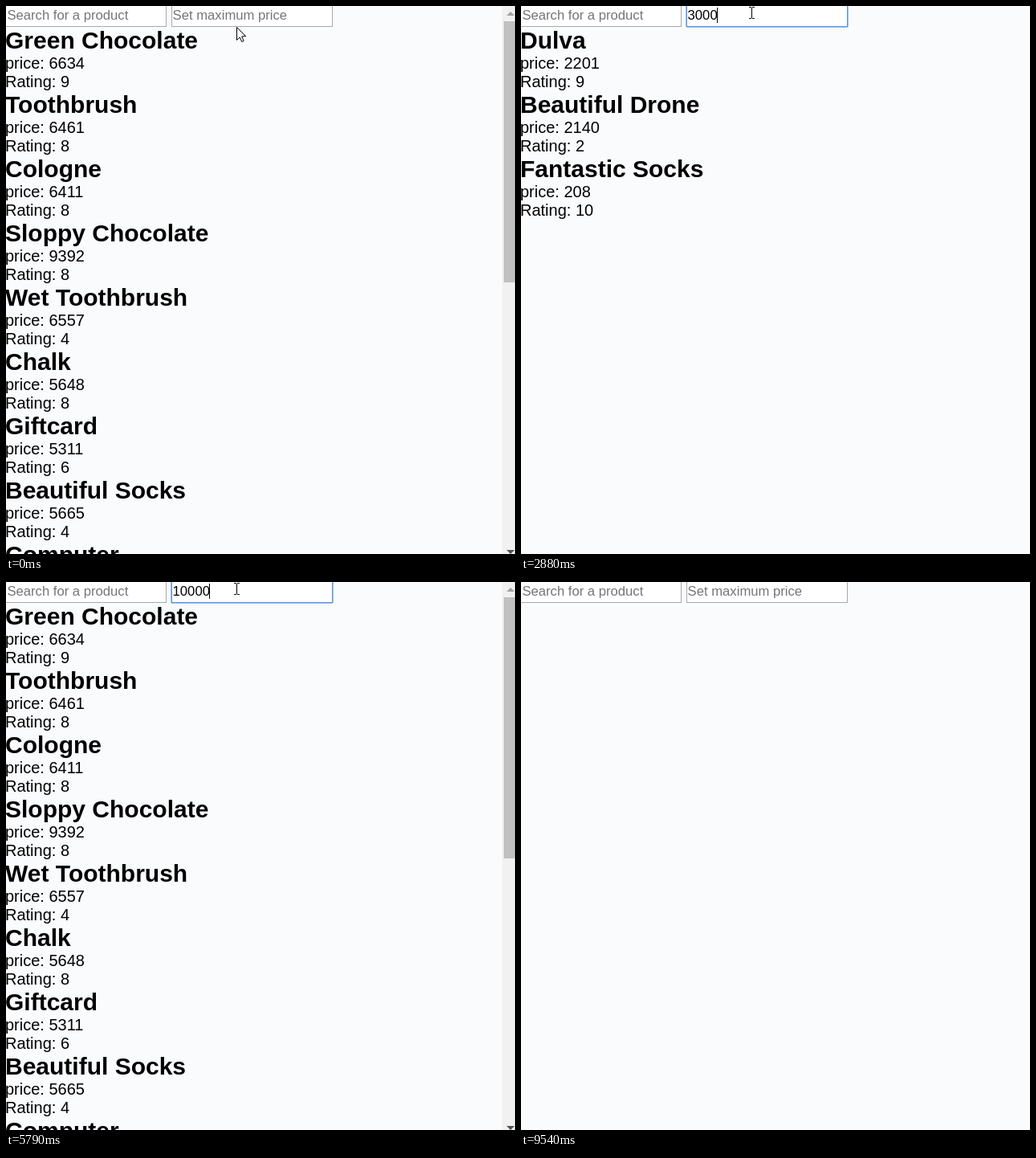
An HTML page with a canvas for the animation above (9640 ms loop, 634 by 682 pixels).

```html
<!DOCTYPE html>
<html lang="en">
<head>
<meta charset="utf-8">
<title>Product filter</title>
<style>
  html, body { margin: 0; width: 100%; height: 100%; overflow: hidden; background: #fafbfd; }
  body { position: relative; font: 20px/23px "Liberation Sans", Arial, sans-serif; color: #000; }
  #list { position: absolute; left: -1px; top: 26px; white-space: nowrap; }
  h2 { margin: 0; font-size: 30px; line-height: 34px; }
  p { margin: 0; }
  .field { position: absolute; top: -3px; height: 28px; box-sizing: content-box; background: #fff;
    border: 1px solid #a9a9a9; border-top: 0; }
  .field span { position: absolute; top: 5px; font-size: 16.667px; line-height: 19px; white-space: pre; color: #757575; }
  #search { left: -2px; width: 200px; }
  #search span { left: 2.4px; }
  #price { left: 206px; width: 199px; }
  #price span { left: .6px; }
  #price.typed span { color: #000; }
  canvas { position: absolute; left: 0; top: 0; }
</style>
</head>
<body>
<div id="list"></div>
<div id="search" class="field"><span>Search for a product</span></div>
<div id="price" class="field"><span></span></div>
<canvas id="stage" width="634" height="682"></canvas>
<script>
const LOOP = 9640;
const products = [
  ['Green Chocolate', 6634, 9], ['Toothbrush', 6461, 8], ['Cologne', 6411, 8],
  ['Sloppy Chocolate', 9392, 8], ['Wet Toothbrush', 6557, 4], ['Chalk', 5648, 8],
  ['Giftcard', 5311, 6], ['Beautiful Socks', 5665, 4], ['Computer', 7120, 7],
  ['Dulva', 2201, 9], ['Beautiful Drone', 2140, 2], ['Fantastic Socks', 208, 10]
];
// time, typed text, caret visible
const typing = [
  [0, '', 0], [660, '', 1], [1120, '3', 1], [1450, '30', 1], [1580, '300', 1],
  [1860, '3000', 1], [2370, '3000', 0], [2880, '3000', 1], [3390, '3000', 0],
  [3540, '300', 0], [3900, '300', 1], [4080, '30', 1], [4230, '3', 1],
  [4380, '', 1], [4410, '', 0], [4590, '1', 1], [4740, '10', 1],
  [5100, '100', 1], [5250, '1000', 1], [5760, '1000', 0], [5790, '10000', 1],
  [6350, '10000', 0], [6860, '10000', 1], [7350, '1000', 1], [7370, '1000', 0],
  [7490, '100', 0], [7640, '10', 0], [7780, '1', 0], [7930, '1', 1],
  [8060, '', 1], [8440, '', 0], [8950, '', 1], [9460, '', 0]
];
// time, x, y of the pointer
const moves = [
  [0, 287, 26], [40, 287, 22], [90, 287, 18], [150, 287, 14], [200, 287, 10], [250, 287, 8],
  [6980, 285, 14], [7040, 282, 27], [7100, 279, 36]
];
const EXIT = 8570, GONE = 9030, EXIT_STEPS = 10;

const $ = id => document.getElementById(id);
const list = $('list'), price = $('price'), label = price.firstChild;
const ctx = $('stage').getContext('2d');
const latest = (rows, t) => rows.filter(r => r[0] <= t).pop();
let shownMax = null, shownText = null;

function showList(max) {
  if (max === shownMax) return;
  shownMax = max;
  list.innerHTML = products.filter(p => p[1] <= max)
    .map(([name, cost, rating]) => `<h2>${name}</h2><p>price: ${cost}</p><p>Rating: ${rating}</p>`).join('');
}

function showText(text) {
  if (text === shownText) return;
  shownText = text;
  label.textContent = text || 'Set maximum price';
  price.classList.toggle('typed', text !== '');
}

function rect(color, x, y, w, h) {
  ctx.fillStyle = color;
  ctx.fillRect(x, y, w, h);
}

function poly(points, fill, stroke) {
  ctx.beginPath();
  points.forEach(([x, y]) => ctx.lineTo(x, y));
  ctx.closePath();
  ctx.fillStyle = fill;
  ctx.fill();
  if (stroke) {
    ctx.strokeStyle = stroke;
    ctx.stroke();
  }
}

function drawScrollbar() {
  rect('#f1f1f1', 618, 0, 16, 682);
  rect('#c1c1c1', 620, 19, 14, 325);
  poly([[623.5, 12], [628.5, 7], [633.5, 12]], '#a3a3a3');
  poly([[623.5, 677], [628.5, 682], [633.5, 677]], '#505050');
}

function drawRing() {
  ctx.lineWidth = 1;
  ctx.strokeStyle = '#9dbfee';
  ctx.beginPath();
  ctx.roundRect(205.5, -4.5, 202, 31, 1.5);
  ctx.stroke();
  ctx.strokeStyle = '#5a94e2';
  ctx.strokeRect(206.5, -3.5, 200, 29);
}

function drawArrow(x, y) {
  ctx.save();
  ctx.translate(x + .5, y + .5);
  ctx.lineWidth = 1;
  poly([[0, 0], [0, 16], [3.7, 12.4], [6.2, 18], [8.6, 17], [6.2, 11.4], [11.2, 11.2]], '#fff', '#000');
  ctx.restore();
}

function drawBeam(x, y) {
  rect('#000', x, y - 6, 1, 13);
  for (const edge of [y - 7, y + 7]) {
    rect('#000', x - 3, edge, 3, 1);
    rect('#000', x + 1, edge, 3, 1);
  }
}

function drawPointer(t) {
  if (t >= GONE) return;
  let [, x, y] = latest(moves, t);
  if (t >= EXIT) {
    const step = (GONE - EXIT) / EXIT_STEPS;
    const p = (Math.floor((t - EXIT) / step) + 1) / EXIT_STEPS;
    x = Math.round(279 + 238 * p);
    y = Math.round(36 + 660 * p ** 1.3);
  }
  (y < 26 ? drawBeam : drawArrow)(x, y);
}

function render(t) {
  const [, text, caret] = latest(typing, t);
  const max = t < 1120 ? Infinity : Number(text);
  showList(max);
  showText(text);
  ctx.clearRect(0, 0, 634, 682);
  if (max >= 10000) drawScrollbar();
  if (t >= 610 && t < 9540) drawRing();
  if (caret) rect('#000', Math.max(208, Math.floor(207.6 + text.length * 9.27)), 2, 1, 19);
  drawPointer(t);
}

const start = performance.now();
function tick() {
  render((performance.now() - start) % LOOP);
  requestAnimationFrame(tick);
}
tick();
</script>
</body>
</html>
```
